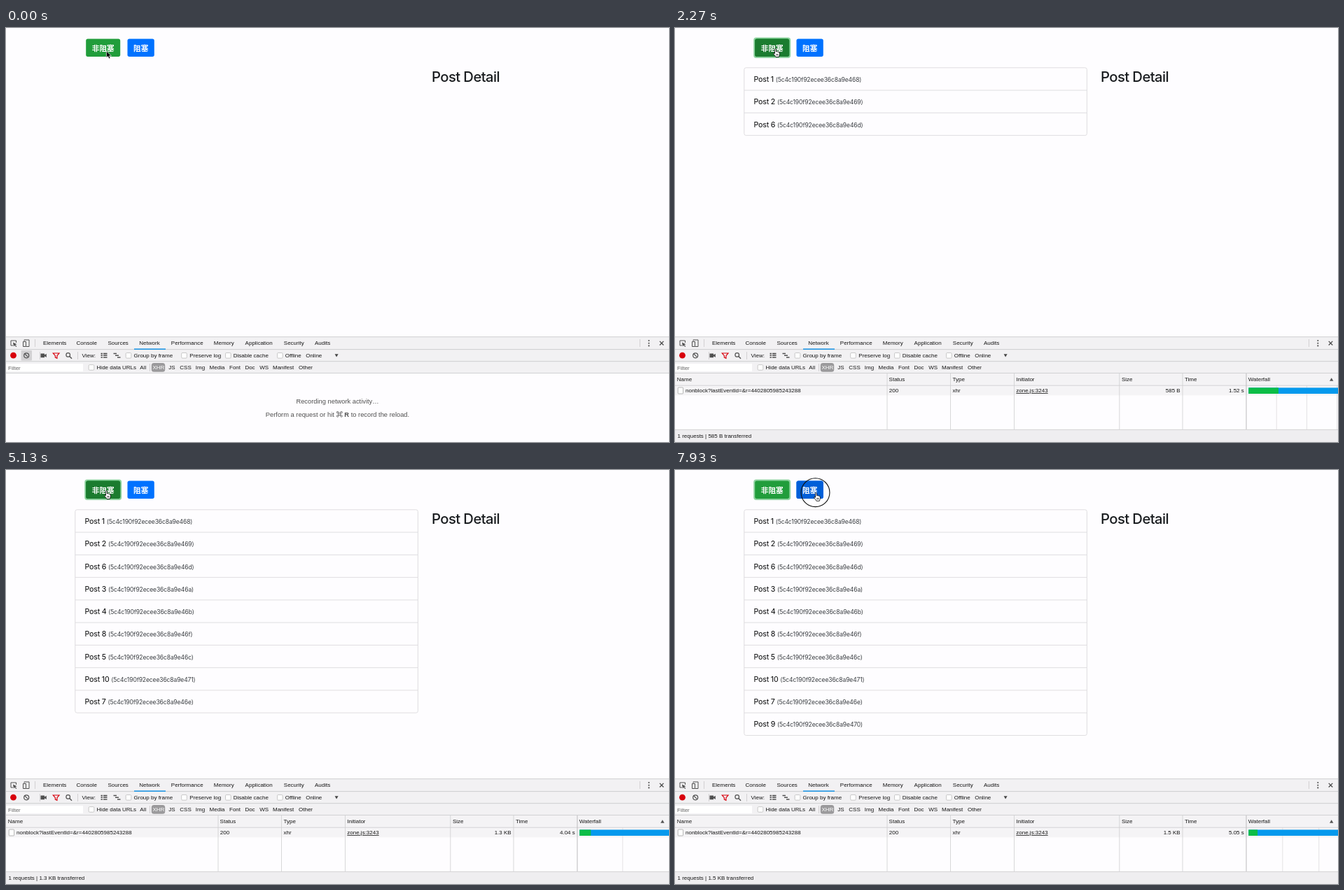
Recreate the animation shown at these times as an HTML page. Size 947 px wide and 592 px high, loop 8 s.

```html
<!DOCTYPE html>
<html lang="zh">
<head>
<meta charset="utf-8">
<title>Post Detail</title>
<style>
  html, body { margin: 0; width: 100%; height: 100%; overflow: hidden; background: #fefdff; }
  svg { display: block; width: 947px; height: 592px; }
  text { font: 8px "Liberation Sans", Arial, sans-serif; fill: #161616; white-space: pre; }
  .title { font: 500 20.3px Inter, sans-serif; letter-spacing: -.6px; fill: #1a1d20; }
  .post { font: 10.7px Inter, sans-serif; letter-spacing: -.2px; fill: #050607; }
  .id { font-size: 8.56px; letter-spacing: -.13px; fill: #3a3e42; }
  .button { font: 700 10.67px "Noto Sans CJK SC", "Noto Sans CJK", sans-serif; fill: #fff; }
  .hint { font-size: 9.33px; fill: #505050; text-anchor: middle; }
  .right { text-anchor: end; }
  .gray { fill: #666; }
  .white { fill: #fff; }
  .link { text-decoration: underline; }
</style>
</head>
<body>
<svg viewBox="0 0 947 592">
  <g id="page"></g>
  <g id="tools"></g>
  <g id="table"></g>
  <g id="pointer"></g>
</svg>
<script>
const LOOP = 8000;
const HOVER = 70;            // pointer rests on the first button
const PRESS = 440;
const SEND = 575;            // request leaves
const CHUNK = 505;           // one post per chunk
const PANEL_LAG = 60;        // the network panel trails the page
const SECOND_PRESS = 7840;
const PAPER = '#fefdff';

const posts = [[1, '68'], [2, '69'], [6, '6d'], [3, '6a'], [4, '6b'],
               [8, '6f'], [5, '6c'], [10, '71'], [7, '6e'], [9, '70']];
const sizes = ['0 B', '302 B', '443 B', '585 B', '727 B', '868 B',
               '1010 B', '1.1 KB', '1.3 KB', '1.4 KB', '1.5 KB'];

const $ = id => document.getElementById(id);
const clamp = (v, lo = 0, hi = 1) => Math.min(hi, Math.max(lo, v));
const text = (x, y, s, cls = '') => `<text x="${x}" y="${y}" class="${cls}">${s}</text>`;
const rect = (x, y, w, h, fill, more = '') =>
  `<rect x="${x}" y="${y}" width="${w}" height="${h}" fill="${fill}" ${more}/>`;
const path = (d, stroke, width = 1, fill = 'none') =>
  `<path d="${d}" stroke="${stroke}" stroke-width="${width}" fill="${fill}"/>`;
const checkbox = (x, y) => rect(x - 3.8, y - 3.8, 7.6, 7.6, '#fff', 'rx="1.3" stroke="#bdbdbd" stroke-width=".8"');
const labels = (y, list) => list.map(([x, s]) => text(x, y, s)).join('');

function drawTools() {
  const ink = '#505050';
  $('tools').innerHTML =
    rect(0, 442, 947, 52, '#f2f1f3') +
    path('M0 441.7H947M0 459.6H947M0 476.7H947M0 493.6H947', '#cbcacc', .9) +
    path('M41.5 445V456M905.5 445V456M48.5 463V474M102.5 463V474M205.5 480V491', '#c9c8ca', .8) +
    rect(183, 458.4, 45, 1.6, '#2196e3') +
    // inspect and device icons
    path('M10 454H7V447H14.5V450', ink, 1) +
    path('M10 449.5L15.5 452.2L13.2 453L15.3 455.3L14.3 456L12.4 453.8L11 455.6Z', 'none', 0, ink) +
    path('M26 447.5V446H33V455.5H29M24.5 448.5H28.5V455.5H24.5Z', ink, 1) +
    labels(453.3, [[53, 'Elements'], [100.5, 'Console'], [145.5, 'Sources'], [190.3, 'Network'],
      [235.8, 'Performance'], [296.8, 'Memory'], [341.6, 'Application'], [396.8, 'Security'], [441, 'Audits']]) +
    [447, 450.7, 454.4].map(y => `<circle cx="918.3" cy="${y}" r="1.05" fill="${ink}"/>`).join('') +
    path('M933.7 447.9L939.3 453.5M939.3 447.9L933.7 453.5', '#444', 1.2) +
    // record, clear, camera, funnel and search
    '<circle cx="10.5" cy="468.2" r="4.4" fill="#d8000c"/><g id="clearHover">' +
    rect(21.5, 461, 15.5, 14.5, '#d2d1d3', 'rx="1"') + '</g>' +
    `<circle cx="29.2" cy="468.3" r="3.5" fill="none" stroke="${ink}" stroke-width="1.2"/>` +
    path('M26.8 465.9L31.6 470.7', ink, 1.2) +
    path('M49.5 465.5H55V467.5L57.8 465.7V471L55 469.2V471.3H49.5Z', 'none', 0, ink) +
    path('M67.3 465H76L72.9 468.6V472.2L70.4 471V468.6Z', '#d8000c', 1.2) +
    `<circle cx="88.7" cy="467.4" r="2.8" fill="none" stroke="${ink}" stroke-width="1.2"/>` +
    path('M90.8 469.5L94 472.7', ink, 1.4) +
    path('M135.5 465.6H138M135.5 468.3H138M135.5 471H138M139 465.6H144.5M139 468.3H144.5M139 471H144.5', ink, 1.6) +
    path('M153.5 465.5H158M156 468.3H161M159 471H163.5', ink, 1.5) +
    [175, 254.5, 317.3, 391.3].map(x => checkbox(x, 468.3)).join('') +
    labels(471.1, [[108.5, 'View:'], [182.5, 'Group by frame'], [262.3, 'Preserve log'],
      [324.7, 'Disable cache'], [398.7, 'Offline'], [428.2, 'Online']]) +
    path('M469.6 466.3H474.6L472.1 470.6Z', 'none', 0, '#444') +
    // filter bar
    rect(0, 480, 110, 11, '#fff') + text(3, 488.6, 'Filter', 'gray') +
    checkbox(122, 485.4) + rect(207.8, 479, 19.4, 12.8, '#9b9a9c', 'rx="3.5"') +
    text(209.5, 488.3, 'XHR', 'white') +
    labels(488.3, [[129.6, 'Hide data URLs'], [191.3, 'All'], [232.3, 'JS'], [248.3, 'CSS'], [270.8, 'Img'],
      [290.6, 'Media'], [319, 'Font'], [341.4, 'Doc'], [362.2, 'WS'], [381, 'Manifest'], [418, 'Other']]);
}

function button(x, w, label, color, dark, hover, focus) {
  return (focus ? rect(x - 2, 13.6, w + 4, 29.4, '#8fd3a0', 'rx="4"') : '') +
    rect(x, 15.6, w, 25.4, color, 'rx="2.7"') +
    rect(x, 15.6, w, 25.4, dark, `rx="2.7" opacity="${hover}"`) +
    text(x + 8.6, 32.5, label, 'button');
}

function drawPage(t) {
  const hoverGreen = clamp((t - HOVER) / 150) - clamp((t - 6960) / 150);
  const hoverBlue = clamp((t - 7030) / 150);
  const count = clamp(Math.floor((t - SEND) / CHUNK), 0, posts.length);
  const pitch = 32.27;
  let out = button(114.2, 49, '非阻塞', '#219d3b', '#1b7c2f', hoverGreen, t >= PRESS) +
    button(173.5, 38.3, '阻塞', '#0072ff', '#005fd8', hoverBlue, false) +
    text(608, 77, 'Post Detail', 'title');
  if (count) {
    out += rect(98.8, 56.8, 489.6, count * pitch, PAPER, 'rx="2.7" stroke="#dcdbdd" stroke-width=".9"');
  }
  posts.slice(0, count).forEach(([n, tail], i) => {
    const y = 56.8 + i * pitch;
    if (i) out += path(`M98.8 ${y}H588.4`, '#dcdbdd', .9);
    out += text(112.5, y + 20.2, `Post ${n} <tspan class="id">(5c4c190f92ecee36c8a9e4${tail})</tspan>`, 'post');
  });
  $('page').innerHTML = out;
}

// Smallest 1-2-5 step that keeps the divider lines at least 40px apart.
function dividers(seconds) {
  const scale = 131 / seconds;
  const step = [.1, .2, .5, 1, 2, 5].find(s => s * scale >= 40);
  const count = Math.floor(seconds / step - .025);
  return Array.from({ length: count }, (_, i) => 816 + (i + 1) * step * scale);
}

function drawTable(t) {
  if (t < SEND) {
    $('table').innerHTML = rect(0, 494, 947, 98, PAPER) +
      text(473.5, 537.4, 'Recording network activity…', 'hint') +
      text(473.5, 555.8, 'Perform a request or hit <tspan font-weight="bold">⌘ R</tspan> to record the reload.', 'hint');
    return;
  }
  const chunks = clamp(Math.floor((t - SEND - PANEL_LAG) / CHUNK), 0, 10);
  const seconds = chunks * .5051;
  const lines = chunks ? dividers(seconds) : [881.7];
  const time = !chunks ? 'Pending' : chunks === 1 ? '505 ms' : seconds.toFixed(2) + ' s';
  const green = chunks ? 128 / chunks : 0;
  $('table').innerHTML =
    rect(0, 494, 947, 17, '#f4f3f5') + rect(0, 511, 947, 63.5, PAPER) + rect(0, 511.4, 947, 14, '#f5f4f6') +
    path(lines.map(x => `M${x} 511.5V574`).join(''), '#dddcde', .8) +
    path('M0 511.2H947', '#cbcacc', .8) +
    path('M303 494V574M393.5 494V574M484.5 494V574M634.8 494V574M725 494V574', '#cfced0', .8) +
    path('M816 494V574', '#bcbbbd', 1) +
    labels(505.3, [[2.8, 'Name'], [305.6, 'Status'], [396.5, 'Type'], [487.3, 'Initiator'],
      [638, 'Size'], [728, 'Time'], [818.8, 'Waterfall']]) +
    path('M935 504.8H940.4L937.7 500.2Z', 'none', 0, '#555') +
    rect(4.2, 514, 7.4, 9, '#fff', 'rx="1" stroke="#a5a5a5" stroke-width=".8"') +
    text(15, 521, 'nonblock?lastEventId=&amp;r=4402805985243288') +
    text(305.8, 521, chunks ? '200' : '(pending)', chunks ? '' : 'gray') +
    text(396.5, 521, 'xhr') + text(487.3, 521, 'zone.js:3243', 'link') +
    text(721.7, 521, sizes[chunks], 'right') +
    text(812.8, 521, time, chunks ? 'right' : 'right gray') +
    (chunks ? rect(819.3, 514.4, 128, 8.6, '#0599ed') + rect(819.3, 514.4, green, 8.6, '#0dbd47') : '') +
    rect(0, 574.5, 947, 17.5, '#efeef0') + path('M0 574.4H947', '#cbcacc', .8) +
    text(3.5, 586, `1 requests | ${sizes[chunks]} transferred`);
}

function pointerAt(t) {
  const u = clamp((t - 6800) / 130), v = clamp((t - 6930) / 370);
  const ease = v * (2 - v);
  return [140 + 20 * u * u + 38 * ease, 29.5 - 1.5 * u + 4.3 * ease];
}

function ripple(t, start, x, y) {
  const u = (t - start) / 200;
  if (u < 0 || u > 1) return '';
  const r = 24.4 * (1 - (1 - u) ** 3);
  return `<circle cx="${x}" cy="${y}" r="${r}" fill="none" stroke="#111" stroke-width="1.1"/>`;
}

function drawPointer(t) {
  const [x, y] = pointerAt(t);
  const tip = x + 3.4;
  const arrow = t < HOVER || (tip > 165 && tip < 173.5);
  const shape = arrow
    ? path('M3.4 3.5V13L5.6 11L7.2 14.4L9 13.6L7.5 10.3H10.5Z', '#fff', .7, '#000')
    : path('M2.5 7V1.2Q2.5 .1 3.4 .1T4.4 1.2V4.2Q6 3.7 6.4 4.6Q8 4.2 8.2 5.2Q9.4 5.1 9.4 6.5V8.5Q9 10 8.3 12H4Q2.8 9.8 .5 7.4Q.3 5.6 2.5 7ZM5 7.5V10M6.8 7.5V10', '#000', .8, '#fff');
  $('pointer').innerHTML = ripple(t, PRESS, 143.6, 33) + ripple(t, SECOND_PRESS, 200.5, 32.2) +
    `<g transform="translate(${x} ${y})">${shape}</g>`;
}

function frame(now) {
  const t = now % LOOP;
  drawPage(t);
  drawTable(t);
  drawPointer(t);
  $('clearHover').style.display = t < HOVER ? '' : 'none';
  requestAnimationFrame(frame);
}

drawTools();
frame(0);
</script>
</body>
</html>
```
